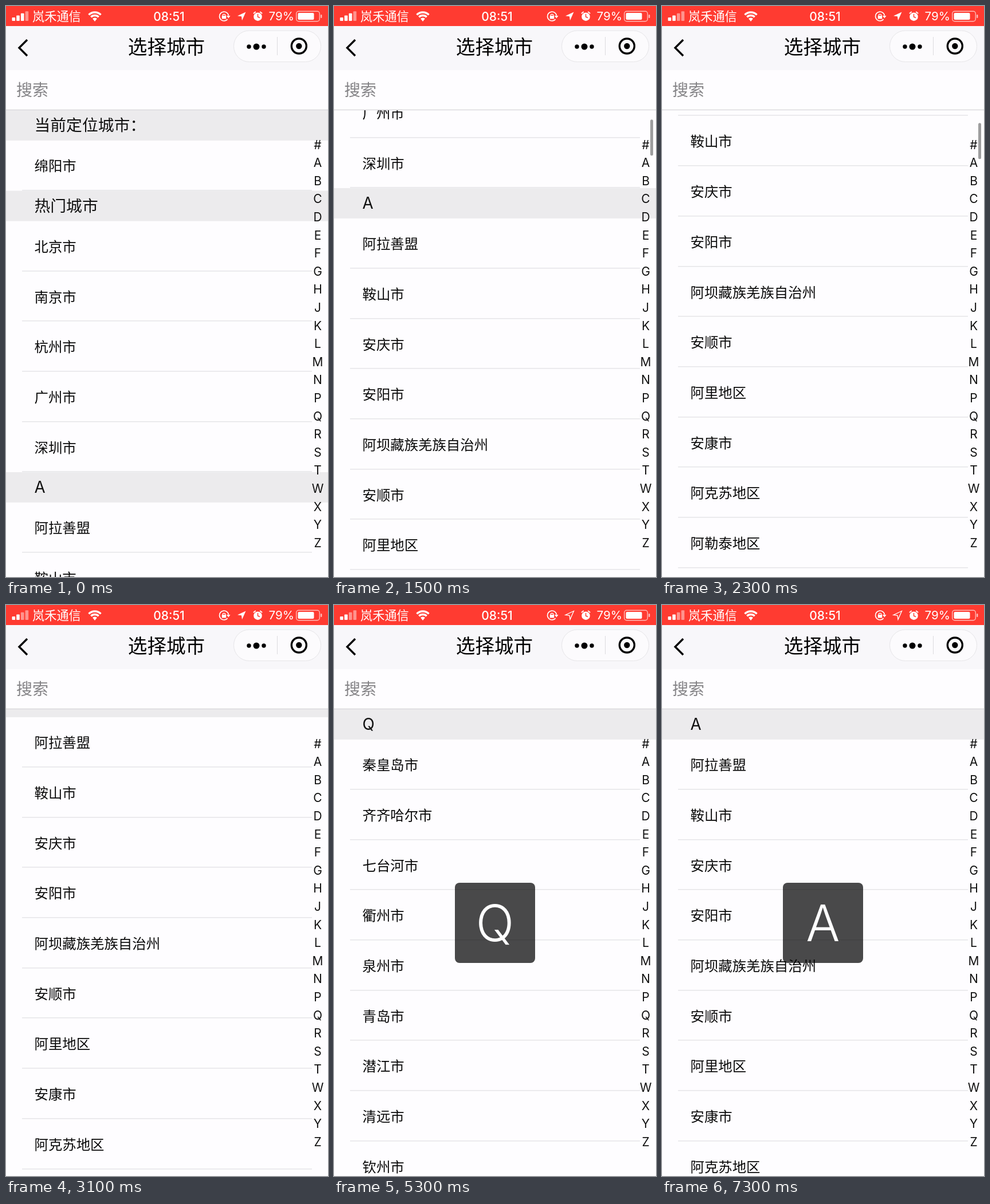
These frames come from a looping animation (562 by 997 pixels, 8000 ms). An HTML page with a canvas:

```html
<!DOCTYPE html>
<html lang="zh-CN">
<head>
<meta charset="utf-8">
<title>选择城市</title>
<style>
  html, body { margin: 0; width: 100%; height: 100%; overflow: hidden; background: #fefdfe; }
  canvas { display: block; width: 562px; height: 997px; }
</style>
</head>
<body>
<canvas id="stage" width="562" height="997"></canvas>
<script>
const W = 562, H = 997, LOOP = 8000;
const ctx = document.getElementById('stage').getContext('2d');
const CJK = '"Noto Sans CJK SC", "Noto Sans CJK", sans-serif';
const LATIN = 'Inter, "Liberation Sans", sans-serif';
const PAGE = '#fefdff', RED = '#ff3b31', WHITE = '#fff', PALE = 'rgba(255,255,255,.45)';

const LIST_TOP = 182, HEAD_H = 52.9, ROW_H = 87.7;
const KEYS = [...'#ABCDEFGHJKLMNPQRSTWXYZ'];

// One line per index letter, plain names get the suffix 市
const CITIES = `A 阿拉善盟 鞍山 安庆 安阳 阿坝藏族羌族自治州 安顺 阿里地区 安康 阿克苏地区 阿勒泰地区 阿拉尔
B 北京 保定 包头 巴彦淖尔 本溪 白山 白城 蚌埠 亳州 滨州
C 承德 沧州 长治 赤峰 朝阳 长春 常州 滁州 池州 长沙
D 大同 大连 丹东 大庆 大兴安岭地区 东营 德州 东莞 德阳 达州
E 鄂尔多斯 鄂州 恩施土家族苗族自治州
F 抚顺 阜新 阜阳 福州 抚州 佛山 防城港
G 赣州 广州 桂林 贵港 广元 广安 贵阳 甘南藏族自治州 固原 果洛藏族自治州
H 邯郸 衡水 呼和浩特 呼伦贝尔 葫芦岛 哈尔滨 鹤岗 黑河 淮安 杭州
J 晋中 晋城 锦州 吉林 鸡西 佳木斯 嘉兴 金华 景德镇 九江
K 开封 昆明 克拉玛依 喀什地区 克孜勒苏柯尔克孜自治州
L 廊坊 临汾 吕梁 辽阳 辽源 连云港 丽水 六安 龙岩 莱芜
M 牡丹江 马鞍山 茂名 梅州 绵阳 眉山
N 南京 南通 宁波 南平 宁德 南昌 南阳 南宁 内江 南充
P 盘锦 莆田 萍乡 平顶山 濮阳 攀枝花 普洱 平凉
Q 秦皇岛 齐齐哈尔 七台河 衢州 泉州 青岛 潜江 清远 钦州 曲靖
R 日照 日喀则
S 石家庄 朔州 沈阳 四平 松原 双鸭山 绥化 上海 苏州 宿迁
T 天津 唐山 太原 通辽 铁岭 通化 泰州 台州 铜陵 泰安
W 乌海 乌兰察布 无锡 温州 芜湖 潍坊 威海 武汉 梧州 文山壮族苗族自治州
X 邢台 辛集 忻州 兴安盟 锡林郭勒盟 徐州 宣城 新余 新乡 许昌
Y 阳泉 运城 营口 延边朝鲜族自治州 伊春 盐城 扬州 鹰潭 宜春 烟台
Z 张家口 镇江 舟山 漳州 淄博 枣庄 郑州 周口 驻马店 株洲 张家界 珠海`;

const items = [];
const tops = {};
let contentH = 0;

function addSection(key, title, rows) {
  if (key) tops[key] = contentH;
  items.push({ title, y: contentH });
  contentH += HEAD_H;
  for (const row of rows) {
    const name = /(盟|地区|自治州)$/.test(row) ? row : row + '市';
    items.push({ name, y: contentH });
    contentH += ROW_H;
  }
}

addSection('#', '当前定位城市：', ['绵阳']);
addSection('', '热门城市', ['北京', '南京', '杭州', '广州', '深圳']);
for (const entry of CITIES.split('\n')) {
  const [key, ...rows] = entry.split(' ');
  addSection(key, key, rows);
}

// time, scroll offset, speed per ms
const SCROLL = [[700, 0, 0], [1500, 496, 0.45], [2300, 762.5, 0], [3100, 671, 0]];

function dragOffset(t) {
  if (t <= SCROLL[0][0]) return 0;
  for (let i = 1; i < SCROLL.length; i++) {
    const [t0, a, va] = SCROLL[i - 1], [t1, b, vb] = SCROLL[i];
    if (t > t1) continue;
    const h = t1 - t0, p = (t - t0) / h, q = 1 - p;
    return a * (1 + 2 * p) * q * q + va * h * p * q * q
      + b * p * p * (3 - 2 * p) - vb * h * p * p * q;
  }
  return SCROLL[SCROLL.length - 1][1];
}

// Letter under the finger while it slides along the index
function touchedKey(t) {
  if (t < 4400) return null;
  let i;
  if (t < 4900) i = 1 + Math.min(3, (t - 4400) / 100);
  else if (t < 6400) i = 4 + Math.min(8, (t - 4800) / 100) * 2.25;
  else if (t < 7300) i = 20 - Math.min(6, (t - 6400) / 100) * 3;
  else i = 1;
  return KEYS[Math.round(i)];
}

function text(str, x, y, size, color, font = CJK, align = 'left', weight = 400) {
  ctx.font = `${weight} ${size}px ${font}`;
  ctx.textAlign = align;
  ctx.fillStyle = color;
  ctx.fillText(str, x, y + size * (font === CJK ? 0.365 : 0.363));
}

function rect(x, y, w, h, color) {
  ctx.fillStyle = color;
  ctx.fillRect(x, y, w, h);
}

function pill(x, y, w, h, r, fill, stroke, width = 1) {
  ctx.beginPath();
  ctx.roundRect(x, y, w, h, r);
  if (fill) {
    ctx.fillStyle = fill;
    ctx.fill();
  }
  if (stroke) {
    ctx.strokeStyle = stroke;
    ctx.lineWidth = width;
    ctx.stroke();
  }
}

function dot(x, y, r, color) {
  ctx.fillStyle = color;
  ctx.beginPath();
  ctx.arc(x, y, r, 0, 7);
  ctx.fill();
}

function line(points, width, color) {
  ctx.strokeStyle = color;
  ctx.lineWidth = width;
  ctx.beginPath();
  points.forEach(([x, y]) => ctx.lineTo(x, y));
  ctx.stroke();
}

function arc(x, y, r, a, b, width, color) {
  ctx.strokeStyle = color;
  ctx.lineWidth = width;
  ctx.beginPath();
  ctx.arc(x, y, r, a, b);
  ctx.stroke();
}

function drawList(offset) {
  ctx.save();
  ctx.beginPath();
  ctx.rect(0, LIST_TOP, W, H - LIST_TOP);
  ctx.clip();
  for (const { title, name, y } of items) {
    const top = LIST_TOP + y - offset;
    if (top > H || top < LIST_TOP - ROW_H) continue;
    if (title) {
      rect(0, top, W, HEAD_H, '#ecebed');
      text(title, 49.5, top + 26, 27.8, '#111', title.length > 1 ? CJK : LATIN);
    } else {
      text(name, 49.5, top + 44.4, 24.4, '#0a0a0a');
      rect(28, Math.round(top + ROW_H - 1.7), 506, 1.5, '#e6e5e8');
    }
  }
  ctx.restore();
}

function drawIndex() {
  KEYS.forEach((key, i) => text(key, 544, 242 + i * 31.6, 21, '#111', LATIN, 'center'));
}

function drawScrollbar(t, offset) {
  if (t < 800 || t >= 3100) return;
  const fade = Math.min(1, (3100 - t) / 300);
  pill(552, 187 + offset * 0.0225, 5, 63, 2.5, `rgba(0,0,0,${0.38 * fade})`);
}

function drawStatus(t) {
  rect(0, 0, W, 35, RED);
  const bars = t < 2000 ? 3 : 2;
  for (let i = 0; i < 4; i++) {
    const h = 6 + i * 3.6;
    pill(10.5 + i * 7.7, 26 - h, 5.6, h, 1, i < bars ? WHITE : PALE);
  }
  text('岚禾通信', 46, 18.5, 21.2, WHITE);

  const up = -Math.PI / 2;
  for (const r of [15, 9.5]) arc(155, 26, r, up - 0.78, up + 0.78, 3.4, WHITE);
  ctx.fillStyle = WHITE;
  ctx.beginPath();
  ctx.moveTo(155, 27);
  ctx.arc(155, 26, 5.6, up - 0.78, up + 0.78);
  ctx.fill();

  text('08:51', 284.5, 18, 21, WHITE, LATIN, 'center', 500);

  // rotation lock
  arc(380.5, 18, 8, 0.7, 6.1, 1.7, WHITE);
  ctx.fillStyle = WHITE;
  ctx.beginPath();
  ctx.moveTo(385, 17);
  ctx.lineTo(391.5, 17);
  ctx.lineTo(388.3, 21.5);
  ctx.fill();
  rect(376.8, 17, 7.4, 5.4, WHITE);
  arc(380.5, 16.8, 2.4, Math.PI, 0, 1.4, WHITE);

  // location arrow
  ctx.beginPath();
  [[418.5, 10.5], [404, 17.3], [411, 18.3], [412, 25.3]].forEach(([x, y]) => ctx.lineTo(x, y));
  ctx.closePath();
  if (t < 4200) ctx.fill();
  else {
    ctx.lineWidth = 1.3;
    ctx.strokeStyle = WHITE;
    ctx.stroke();
  }

  // alarm
  dot(439.5, 18.7, 7.3, WHITE);
  line([[439.5, 14], [439.5, 19], [443, 20.5]], 1.5, RED);
  arc(439.5, 18.7, 9.3, up - 0.95, up - 0.4, 1.8, WHITE);
  arc(439.5, 18.7, 9.3, up + 0.4, up + 0.95, 1.8, WHITE);

  text('79%', 458.5, 18, 20.6, WHITE, LATIN);
  pill(506.7, 9.2, 40.6, 17.6, 4, null, 'rgba(255,255,255,.65)', 1.4);
  pill(509.5, 12, 28, 12, 2, WHITE);
  pill(549, 15, 2.4, 6, 1, 'rgba(255,255,255,.65)');
}

function drawNav() {
  rect(0, 35, W, 77, '#f8f7fa');
  line([[37, 59], [23, 73], [37, 87]], 3.4, '#000');

  text('选择城市', 280, 72, 33.6, '#000', CJK, 'center', 500);

  pill(397.5, 43, 152, 54.5, 27, 'rgba(255,255,255,.6)', '#e6e5e8');
  rect(473, 54, 1, 32, '#dcdbde');
  dot(424, 71, 3.7, '#000');
  dot(437, 71, 5.5, '#000');
  dot(450, 71, 3.7, '#000');
  arc(511.3, 70, 13, 0, 7, 3.4, '#000');
  dot(511.3, 70, 5.2, '#000');

  rect(0, 112, W, 69, PAGE);
  text('搜索', 18, 146.5, 28, '#858487');
  rect(0, 180.7, W, 1.4, '#d9d8db');
}

function drawToast(key) {
  pill(211, 485, 140, 140, 8, 'rgba(0,0,0,.71)');
  text(key, 281, 555.5, 88, WHITE, LATIN, 'center', 300);
}

function draw(now) {
  const t = Math.floor((now % LOOP) / 100) * 100;
  const key = touchedKey(t);
  const offset = key ? tops[key] : dragOffset(t);
  rect(0, 0, W, H, PAGE);
  drawList(offset);
  drawScrollbar(t, offset);
  drawIndex();
  drawNav();
  drawStatus(t);
  if (key) drawToast(key);
}

let start;
function tick(now) {
  start ??= now;
  draw(now - start);
  requestAnimationFrame(tick);
}
draw(0);
requestAnimationFrame(tick);
</script>
</body>
</html>
```
